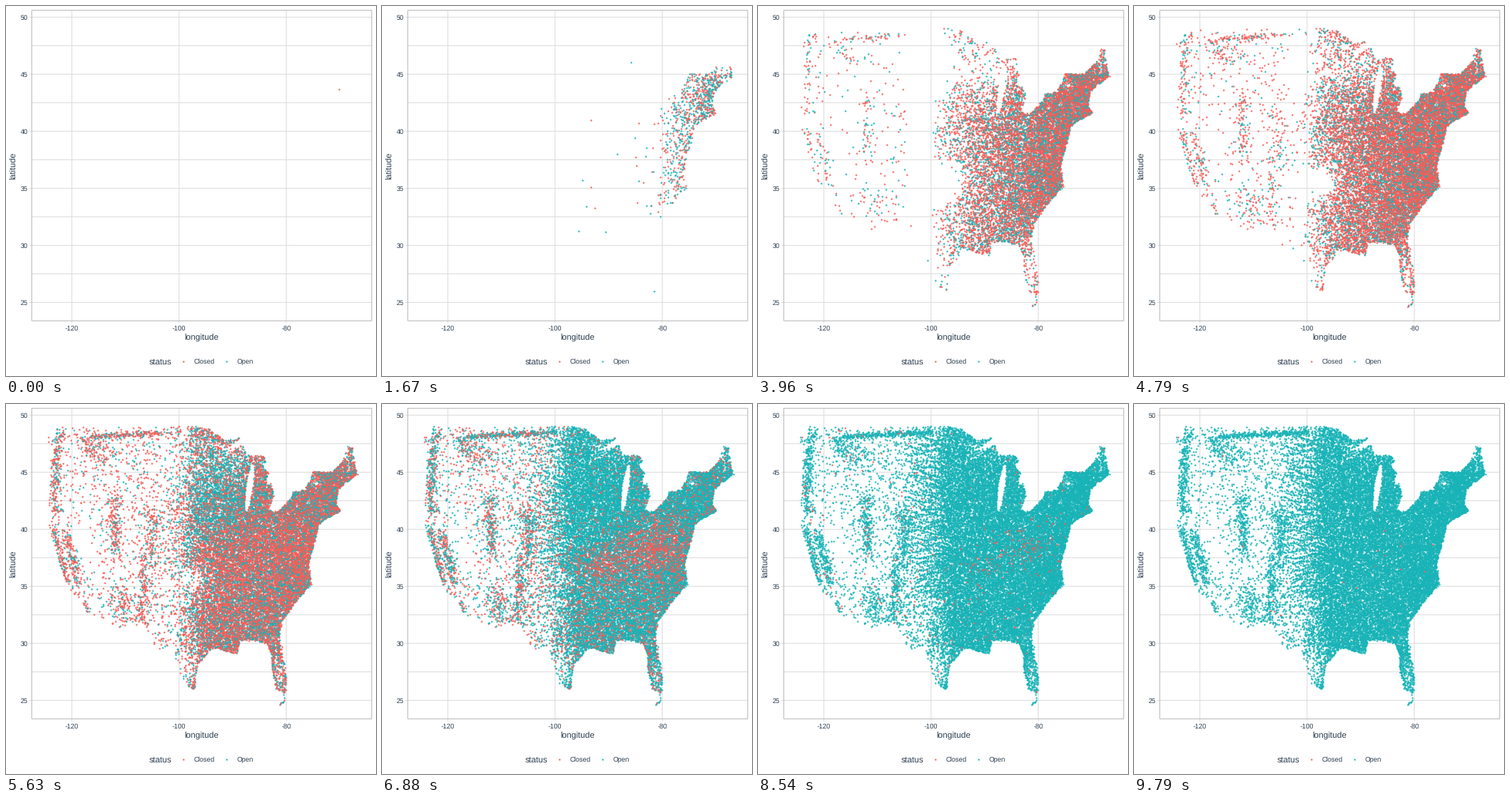
Recreate the animation shown at these times as a matplotlib script. Size 480 by 480 pixels, loop 10000 ms.

```python
import numpy as np
import matplotlib.pyplot as plt
from matplotlib.animation import FuncAnimation
from matplotlib.path import Path

SIZE, DPI = 480, 80
PX = 72 / DPI                      # one pixel in points
FRAMES, LOOP_MS = 48, 10000
RED, TEAL = "#f75c57", "#18b3b7"
INK, GRID, BORDER = "#2c3e50", "#dedede", "#bebebe"
DOT = 2.2 * PX
LAYERS = 8
LEFT, RIGHT, TOP, BOTTOM = 33.5, 474.5, 5.5, 408.5

rng = np.random.default_rng(7)
plt.rcParams["font.family"] = "Liberation Sans"
plt.rcParams["text.hinting"] = "none"

# Key points of the country's outline in pixels, clockwise from the north-west.
NORTH = [(66, 29), (245, 29), (262, 32), (285, 47), (305, 43), (280, 61),
         (307, 53), (312, 66), (333, 66), (338, 74), (331, 78), (340, 89),
         (336, 107), (343, 103), (347, 118), (340, 137), (352, 140),
         (371, 120), (371, 114), (388, 111), (398, 88), (423, 88), (436, 74),
         (443, 55), (449, 56)]
EAST = [(455, 90), (430, 110), (428, 130), (433, 138), (406, 154), (392, 207),
        (395, 233), (378, 253), (357, 281), (354, 300), (363, 358), (362, 376),
        (351, 369), (345, 345), (345, 325), (338, 310), (320, 305), (304, 306),
        (299, 324), (268, 315), (247, 338), (244, 371)]
WEST = [(231, 364), (222, 336), (215, 314), (203, 321), (193, 315), (179, 284),
        (148, 291), (106, 272), (96, 251), (81, 242), (59, 173), (55, 150),
        (58, 74), (53, 39), (63, 42)]
LAND = Path(NORTH + EAST + WEST)

# Western valleys and railways: start, end, spread
VALLEYS = [((67, 30), (63, 140), 3.5), ((76, 165), (96, 235), 4),
           ((62, 160), (78, 235), 3), ((85, 247), (106, 268), 4),
           ((97, 40), (112, 65), 5), ((118, 62), (145, 72), 9),
           ((140, 120), (142, 195), 4), ((188, 135), (190, 210), 5),
           ((180, 205), (178, 285), 5), ((145, 240), (156, 288), 8),
           ((110, 42), (225, 36), 2)]


def bump(x, y, cx, cy, sx, sy):
    return np.exp(-((x - cx) / sx) ** 2 / 2 - ((y - cy) / sy) ** 2 / 2)


def rise(v, middle, width):
    return 1 / (1 + np.exp(-(v - middle) / width))


def in_lake(x, y):
    """The long lake: a tilted ellipse."""
    across = x - 315.5 + .14 * (y - 108)
    return (across / 4.7) ** 2 + ((y - 108) / 31) ** 2 < 1


def density(x, y):
    """Places per square pixel."""
    d = (.035 + .6 * rise(x, 238, 8) + .35 * rise(x, 375, 20)
         + .04 * bump(x, 0, 207, 0, 22, 1))
    thin = (.7 * bump(x, y, 105, 180, 25, 30)       # desert
            + .75 * bump(x, y, 400, 102, 5, 6)      # mountains
            + .8 * bump(x, y, 442, 65, 12, 16)
            + .7 * bump(x, y, 356, 355, 8, 30)
            + .6 * bump(x, y, 236, 345, 14, 22)
            + .5 * bump(x, y, 295, 50, 30, 18))
    return d * np.clip(1 - thin, .1, 1)


def scatter_land():
    n = 410 * 370
    x, y = rng.uniform(50, 460, n), rng.uniform(25, 395, n)
    keep = rng.random(n) < density(x, y)
    return np.column_stack([x, y])[keep]


def along(points, per_px, spread):
    """Places strung along a polyline."""
    p = np.array(points, float)
    dist = np.r_[0, np.cumsum(np.hypot(*np.diff(p, axis=0).T))]
    s = rng.uniform(0, dist[-1], int(dist[-1] * per_px))
    line = np.column_stack([np.interp(s, dist, p[:, 0]),
                            np.interp(s, dist, p[:, 1])])
    return line + rng.normal(0, spread, line.shape)


def plains_line(y0):
    """A river valley running over the plains."""
    x = np.arange(rng.uniform(190, 212), 250, 1.9)
    tilt = .25 * np.cos((y0 - 100) / 50)
    wave = 1.8 * np.sin(x / rng.uniform(5, 9) + rng.uniform(0, 6))
    line = np.column_stack([x, y0 + tilt * (x - 225) + wave])
    return line + rng.normal(0, .4, line.shape)


def births(x, y):
    """Frame in which each place first shows: a front moving west."""
    start = 2 + 13.5 * np.clip((430 - x) / 185, 0, 1)
    start += (5 * bump(x, 0, 207, 0, 14, 1)
              + 7 * bump(x, y, 315, 78, 40, 28)
              + 9 * bump(x, y, 352, 345, 15, 30)
              + 9 * bump(x, y, 442, 62, 10, 15)
              + 9 * bump(x, y, 241, 228, 17, 15)
              + 4 * bump(x, y, 225, 70, 20, 35))
    start += rng.normal(0, .7, x.size)
    born = np.maximum(start, 2) + 14 * rng.random(x.size) ** .75
    pioneer = (x > 236) & (rng.random(x.size) < .001)
    return np.where(pioneer, rng.uniform(4, 14, x.size), born)


def build_places():
    inland = [scatter_land()]
    inland += [along(v[:2], 2.8, v[2]) for v in VALLEYS]
    inland += [plains_line(y) for y in np.linspace(45, 250, 28)]
    inland = np.vstack(inland)
    inland = inland[LAND.contains_points(inland) & ~in_lake(*inland.T)]
    keys = [(362, 378), (360, 386), (352, 391)]
    xy = np.vstack([inland, along(EAST, .4, .6), along(keys, .6, .4)])
    xy = rng.permutation(xy)
    return xy, births(*xy.T), rng.random(len(xy))


def turning_time(x, y):
    """Frame around which a region goes from closed to open."""
    return (31.3 + 3 * (1 - rise(x, 215, 10))
            + 6.5 * bump(x, y, 347, 188, 32, 22)
            + 5 * bump(x, y, 285, 208, 18, 18)
            - 5.5 * bump(x, y, 270, 115, 38, 55)
            - 1.5 * bump(x, y, 415, 120, 25, 25))


def closed_share(t):
    ease = np.clip((t - 12) / 11, 0, 1)
    peak = .5 + .24 * ease ** 2 * (3 - 2 * ease)
    return peak * rise(turning, t, 2.3)


xy, born, luck = build_places()
xy[0], born[0], luck[0] = (431.5, 108), 0, 0     # the oldest place
turning = turning_time(*xy.T)
layer = np.arange(born.size) % LAYERS

fig = plt.figure(figsize=(SIZE / DPI, SIZE / DPI), dpi=DPI, facecolor="white")
ax = fig.add_axes([0, 0, 1, 1])
ax.set_xlim(0, SIZE)
ax.set_ylim(SIZE, 0)
ax.axis("off")


def rule(xs, ys, color=GRID, z=1):
    ax.plot(xs, ys, color=color, lw=PX, zorder=z, snap=False,
            solid_joinstyle="miter", solid_capstyle="butt")


def label(x, y, text, size, ha="center", rotation=0):
    ax.text(x, y, text, size=size * PX, color=INK, ha=ha, va="baseline",
            rotation=rotation, rotation_mode="anchor")


def dots(color, z, x=(), y=()):
    return ax.plot(x, y, "o", ms=DOT, mfc=color, mew=0, zorder=z)[0]


def draw_frame():
    for i in range(11):
        y = 14.5 + 37 * i
        major = i % 2 == 0
        rule([LEFT - 3 * major, RIGHT], [y, y])
        if major:
            label(28.3, y + 3.2, str(50 - i * 5 // 2), 8.8, ha="right")
    for i in range(3):
        x = 85.5 + 139 * i
        rule([x, x], [TOP, BOTTOM + 3])
        label(x, 421.3, str(20 * i - 120), 8.8)
    rule([LEFT, RIGHT, RIGHT, LEFT, LEFT],
         [TOP, TOP, BOTTOM, BOTTOM, TOP], BORDER, 50)
    label(253.8, 434, "longitude", 11)
    label(13.3, 207.5, "latitude", 11, rotation=90)
    label(186, 465, "status", 11, ha="left")
    for x, text, color in ((230, "Closed", RED), (285.7, "Open", TEAL)):
        label(x + 14, 464.2, text, 8.8, ha="left")
        dots(color, 2, [x], [461])


draw_frame()

# Layers alternate which colour lies on top, so the two mix evenly.
closed_dots = [dots(RED, 10 + 2 * i + i % 2) for i in range(LAYERS)]
open_dots = [dots(TEAL, 11 + 2 * i - i % 2) for i in range(LAYERS)]


def update(frame):
    t = 0 if frame < 2 else frame
    closed = luck < closed_share(t)
    shown = born <= t
    for i in range(LAYERS):
        here = shown & (layer == i)
        closed_dots[i].set_data(*xy[here & closed].T)
        open_dots[i].set_data(*xy[here & ~closed].T)
    return closed_dots + open_dots


anim = FuncAnimation(fig, update, frames=FRAMES, interval=LOOP_MS / FRAMES,
                     repeat=True, repeat_delay=0, blit=False)
plt.show()
```
